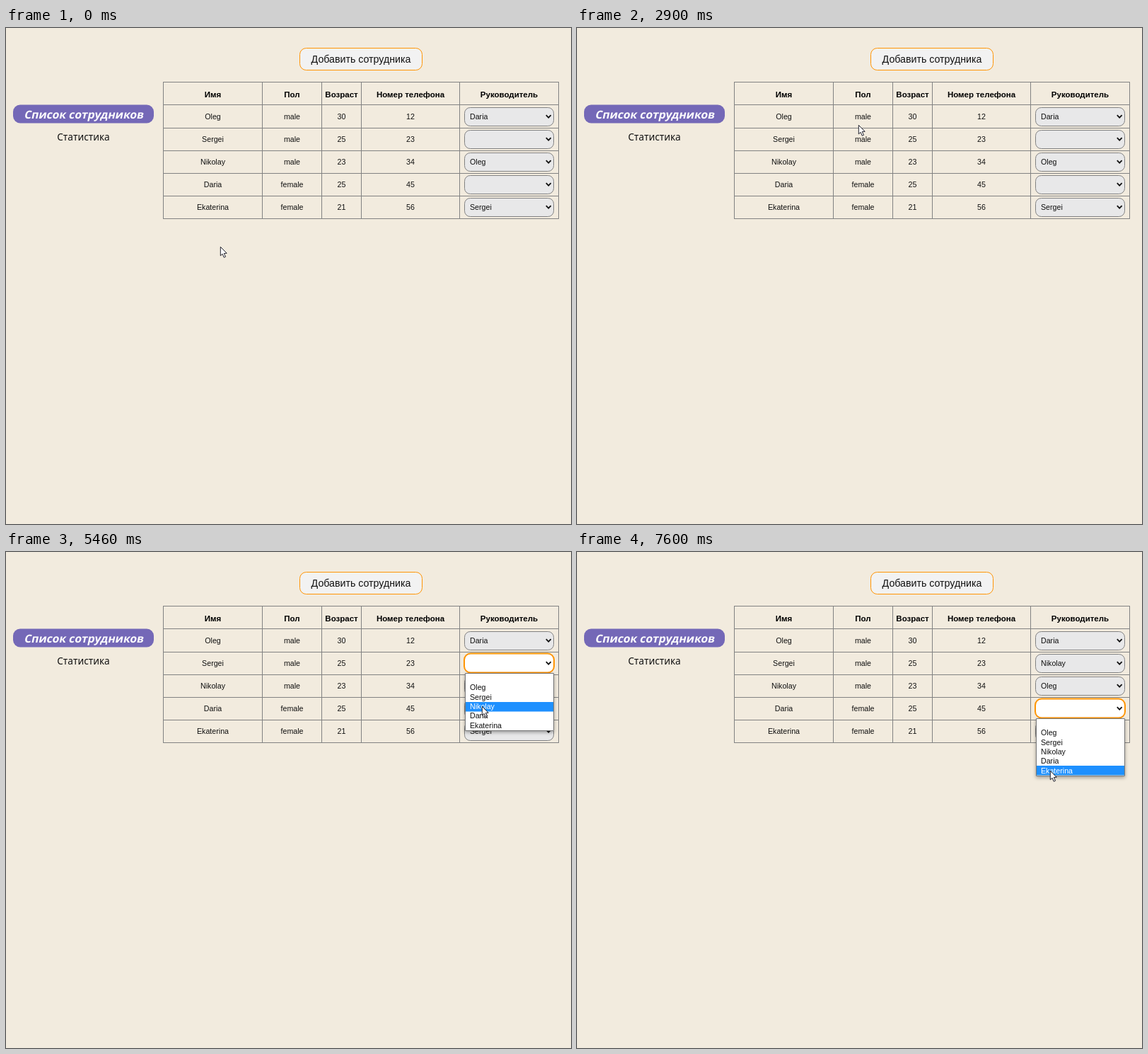
Animation, 799 px wide and 701 px high, one loop 8 s. Source, as an HTML page with a canvas:

```html
<!DOCTYPE html>
<html lang="ru">
<head>
<meta charset="utf-8">
<title>Список сотрудников</title>
<style>
  html, body { margin: 0; width: 100%; height: 100%; overflow: hidden; background: #f2ebde; }
  canvas { display: block; }
</style>
</head>
<body>
<canvas id="stage" width="799" height="701"></canvas>
<script>
const ctx = document.getElementById('stage').getContext('2d');
const LOOP = 8000;
const STEP = 88;
const SANS = '"Liberation Sans", Arial, sans-serif';
const HUMAN = '"Noto Sans", "Open Sans", sans-serif';
const BODY = '10.67px ' + SANS;
const ORANGE = '#ff9505', GRAY = '#828282', INK = '#111', DARK = '#20202c';

const EDGES = [222.5, 362.5, 446.5, 502.5, 641.5, 781.5];
const HEADS = ['Имя', 'Пол', 'Возраст', 'Номер телефона', 'Руководитель'];
const PEOPLE = [
  ['Oleg', 'male', 30, 12, 'Daria'],
  ['Sergei', 'male', 25, 23, ''],
  ['Nikolay', 'male', 23, 34, 'Oleg'],
  ['Daria', 'female', 25, 45, ''],
  ['Ekaterina', 'female', 21, 56, 'Sergei']
];
const OPTIONS = ['', ...PEOPLE.map(p => p[0])];
const OPTION_H = 13.35;

const FIRST_OPEN = 4790, PICKED = 6010, SECOND_OPEN = 6910;

// Pointer strokes, each starting where the last one ended;
// the bends are Bézier controls, without them the stroke is straight
const START = [303, 309];
const STROKES = [
  { from: 70, to: 160, end: [303, 298] },
  { from: 410, to: 500, end: [303, 295] },
  { from: 660, to: 1380, end: [282, 130], bends: [[270, 280], [262, 190]] },
  { from: 1470, to: 2110, end: [310, 274], bends: [[290, 75], [292, 180]] },
  { from: 2200, to: 2200, end: [361, 268] },
  { from: 2290, to: 2900, end: [398, 137], bends: [[372, 225], [385, 160]] },
  { from: 2990, to: 3080, end: [418, 126] },
  { from: 3170, to: 3260, end: [489, 121] },
  { from: 3440, to: 4240, end: [589, 243], bends: [[455, 210], [500, 320]] },
  { from: 4330, to: 4600, end: [696, 157] },
  { from: 4790, to: 5460, end: [673, 218] },
  { from: 6010, to: 6390, end: [676, 253] },
  { from: 6530, to: 6770, end: [676, 221] },
  { from: 6910, to: 7600, end: [669, 309] }
];

const lerp = (a, b, u) => a.map((v, i) => v + (b[i] - v) * u);

function curve(points, u) {
  while (points.length > 1)
    points = points.slice(1).map((p, i) => lerp(points[i], p, u));
  return points[0];
}

// The pointer is seen only at whole steps of a stroke
function pointerAt(t) {
  let pos = START;
  for (const { from, to, end, bends = [] } of STROKES) {
    if (t < from) break;
    const last = Math.round((to - from) / STEP);
    const step = t >= to ? last : Math.floor((t - from + 5) / (to - from) * last);
    pos = curve([pos, ...bends, end], (step + 1) / (last + 1));
  }
  return pos;
}

function text(str, x, y, font, color = INK, align = 'center') {
  ctx.font = font;
  ctx.fillStyle = color;
  ctx.textAlign = align;
  ctx.fillText(str, x, y);
}

function box(x, y, w, h, r, fill, stroke, line = 1) {
  ctx.beginPath();
  ctx.roundRect(x, y, w, h, r);
  ctx.fillStyle = fill;
  ctx.fill();
  if (!stroke) return;
  ctx.strokeStyle = stroke;
  ctx.lineWidth = line;
  ctx.stroke();
}

function polyline(points, color, width) {
  ctx.beginPath();
  for (const [x, y] of points) ctx.lineTo(x, y);
  ctx.strokeStyle = color;
  ctx.lineWidth = width;
  ctx.stroke();
}

const rowMid = row => Math.round(125 + row * 32.1);

function drawSelect(row, value, focused) {
  const y = rowMid(row);
  if (focused) box(648, y - 13.5, 127, 27, 9, '#fff', ORANGE, 2);
  else box(648.5, y - 12.5, 126, 26, 8, '#e8e8e9', GRAY);
  text(value, focused ? 655 : 656, y + 4, BODY, INK, 'left');
  polyline([[763.8, y - 1.8], [767.2, y + 1.7], [770.6, y - 1.8]], INK, 1.8);
}

function drawMenu(row, pointerY) {
  const top = rowMid(row) + 14;
  ctx.save();
  ctx.shadowColor = 'rgba(0,0,0,.35)';
  ctx.shadowBlur = 5;
  ctx.shadowOffsetY = 2;
  box(649, top, 126, 82, 0, '#fff');
  ctx.restore();
  box(649.5, top + 0.5, 125, 81, 0, '#fff', '#777');
  const hot = Math.max(0, Math.min(5, Math.floor((pointerY - top) / OPTION_H)));
  OPTIONS.forEach((name, i) => {
    const y = top + 0.5 + i * OPTION_H;
    if (i === hot) box(650, Math.round(y), 124, 13.5, 0, '#1e90ff');
    text(name, 656, Math.round(y + 10.3), BODY, i === hot ? '#fff' : INK, 'left');
  });
}

function drawSide() {
  box(10, 108.5, 199, 26, 10, '#7468b7');
  ctx.save();
  ctx.translate(109.7, 128);
  ctx.transform(1, 0, -0.21, 1, 0, 0);
  text('Список сотрудников', 0, 0, 'bold 15.7px ' + HUMAN, '#fff');
  ctx.restore();
  text('Статистика', 109.5, 159, '13.6px ' + HUMAN);
}

function drawTable() {
  for (const x of EDGES) polyline([[x, 76], [x, 270]], GRAY, 1);
  for (let i = 0; i <= 6; i++) {
    const y = Math.round(76.3 + i * 32.15) + 0.5;
    polyline([[222, y], [782, y]], GRAY, 1);
  }
  const mid = c => (EDGES[c] + EDGES[c + 1]) / 2;
  HEADS.forEach((h, c) => text(h, mid(c), 97.5, 'bold 11.5px ' + SANS, '#000'));
  PEOPLE.forEach((p, r) => {
    for (let c = 0; c < 4; c++) text(p[c], mid(c), rowMid(r) + 4, BODY);
  });
}

function drawArrow(x, y) {
  ctx.save();
  ctx.translate(x + 0.3, y + 0.3);
  ctx.fillStyle = '#fff';
  ctx.strokeStyle = DARK;
  ctx.lineWidth = 1;
  const shape = new Path2D('M0 0V12.6L2.8 10L5 15L7.2 14L5 9.2L8.9 9Z');
  ctx.fill(shape);
  ctx.stroke(shape);
  ctx.restore();
}

function drawCaret(x, y) {
  polyline([[x, y - 8], [x, y + 8]], DARK, 1);
  for (const d of [-8, 8]) polyline([[x - 2.5, y + d], [x + 2.5, y + d]], DARK, 1);
}

function draw(t) {
  const [x, y] = pointerAt(t);
  const focus = t >= SECOND_OPEN ? 3 : t >= FIRST_OPEN ? 1 : -1;
  const open = t >= SECOND_OPEN || (t >= FIRST_OPEN && t < PICKED);

  ctx.fillStyle = '#f2ebde';
  ctx.fillRect(0, 0, 799, 701);
  box(415.5, 28.5, 173, 31, 9, '#f2f2f2', ORANGE);
  text('Добавить сотрудника', 502, 49, '14.2px ' + SANS);
  drawSide();
  drawTable();
  PEOPLE.forEach((p, r) =>
    drawSelect(r, r === 1 && t >= PICKED ? 'Nikolay' : p[4], r === focus));
  if (open) drawMenu(focus, y);
  const overText = t >= 3080 && t < 3170;
  (overText ? drawCaret : drawArrow)(x, y);
}

const begin = performance.now();
function tick() {
  draw((performance.now() - begin) % LOOP);
  requestAnimationFrame(tick);
}
tick();
</script>
</body>
</html>
```
